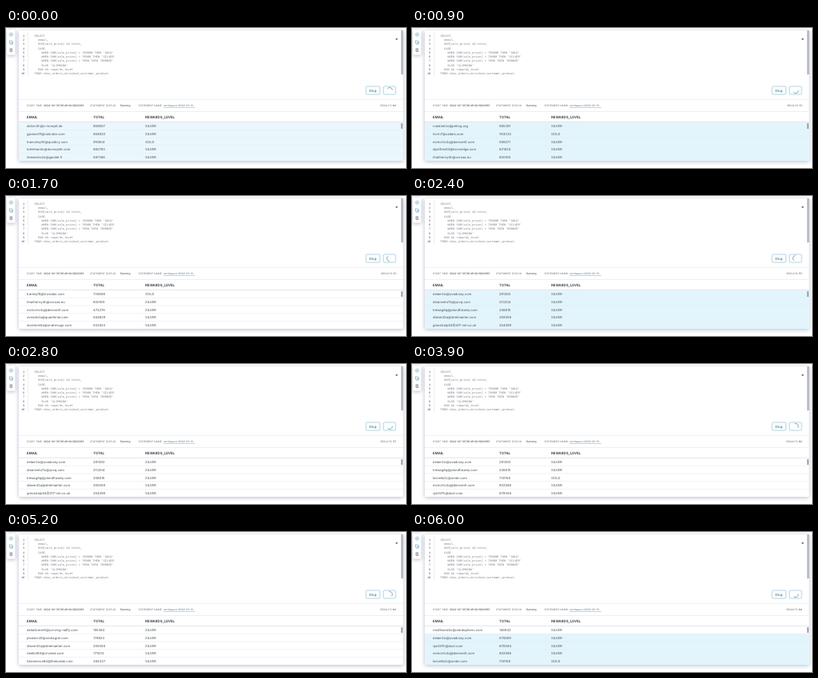
An HTML page that plays this animation: 500 px wide and 175 px high, repeating every 6.1 s.

```html
<!DOCTYPE html>
<html lang="en">
<head>
<meta charset="utf-8">
<title>Streaming query results</title>
<style>
  html, body { margin: 0; width: 100%; height: 100%; overflow: hidden; background: #fff; }
  svg { display: block; width: 500px; height: 175px; text-rendering: geometricPrecision; }
  text { font-family: Inter, sans-serif; font-size: 4.1px; fill: #4b4f56; white-space: pre; }
  .code text { font-family: "Liberation Mono", monospace; font-size: 3.68px; fill: #777b82; }
  .code .num { text-anchor: end; fill: #555; }
  .info text { font-size: 3.25px; font-weight: 500; fill: #4c5158; }
  .info .label { font-size: 3.15px; fill: #7d828b; }
  .info .link { font-weight: 400; fill: #4d7890; text-decoration: underline; }
  .head text { font-size: 4.35px; font-weight: 600; fill: #33373d; }
  .panel { fill: #fff; filter: drop-shadow(0 1px 2.5px rgba(65, 70, 115, .38)); }
  .button { fill: #fff; stroke: #94c3d5; stroke-width: .7; }
  .icon { fill: none; stroke: #6aa9be; stroke-width: .6; }
</style>
</head>
<body>
<svg viewBox="0 0 500 175">
  <rect class="panel" x="1" y="2" width="10.5" height="31.5" rx="1"/>
  <g class="icon">
    <circle cx="6.4" cy="8.2" r="2.1"/>
    <path d="M5.4 8.2h2M6.4 7.2v2"/>
    <rect x="4.3" y="16" width="3" height="3"/>
    <path d="M5.7 19v1.2h2.8v-3h-1.2"/>
    <path stroke="#666b74" d="M4.5 26.2h3.6M5 26.4v3.2h2.6v-3.2M5.6 25.6h1.4M6.3 27v2"/>
  </g>

  <rect class="panel" x="16" y="3" width="480.5" height="163" rx="1"/>
  <path d="M27.5 5V60" stroke="#e1e3e7" stroke-width=".6"/>
  <g class="code" id="code"></g>
  <rect x="493.8" y="3" width="2.7" height="55" fill="#b4b7c2"/>
  <path d="M486.6 13.2h3.4l-1.7 2z" fill="#555"/>

  <rect class="button" x="450" y="73" width="17.3" height="10" rx="1"/>
  <text x="458.6" y="79.6" text-anchor="middle" style="fill:#357f9c;font-size:4.4px;font-weight:500">Stop</text>
  <rect class="button" x="471.8" y="73" width="15.2" height="10" rx="1"/>
  <path id="spinner" d="M-3.3 -1.2A3.5 3.5 0 0 1 3.3 -1.2" fill="none" stroke="#5f8fa4" stroke-width=".7"/>

  <path d="M16 89.3H496.5M16 104.5H496.5" stroke="#dfe2e6" stroke-width=".6"/>
  <g class="info">
    <text class="label" x="26" y="98.2">START TIME:</text>
    <text x="47" y="98.2">2024-02-13T09:49:06.580339Z</text>
    <text class="label" x="105" y="98.2">STATEMENT STATUS:</text>
    <text x="142.8" y="98.2">Running</text>
    <text class="label" x="165.5" y="98.2">STATEMENT NAME:</text>
    <text class="link" x="197" y="98.2">workspace-2024-02-13...</text>
    <text class="label" x="487.5" y="98.2" text-anchor="end">RESULTS: <tspan id="count" fill="#4c5158"></tspan></text>
  </g>
  <g class="head">
    <text x="26" y="112.6">EMAIL</text>
    <text x="109" y="112.6">TOTAL</text>
    <text x="174" y="112.6">REWARDS_LEVEL</text>
  </g>
  <g id="rows"></g>
  <path d="M16 117.3H496.5" stroke="#cfd3d8" stroke-width=".6"/>
  <rect x="493.8" y="119" width="2" height="7" rx=".6" fill="#9a9ea6"/>
</svg>
<script>
const LOOP = 6100, TICK = 100, FLASH = 350, FADE = 200;
const SPIN_START = 15, SPIN_RATE = .563; // degrees, degrees per ms
const ROW_TOP = 117.5, ROW_HEIGHT = 9.72;

const sql = `SELECT
  email,
  SUM(sale_price) AS total,
  CASE
    WHEN SUM(sale_price) > 700000 THEN 'GOLD'
    WHEN SUM(sale_price) > 70000 THEN 'SILVER'
    WHEN SUM(sale_price) > 7000 THEN 'BRONZE'
    ELSE 'CLIMBING'
  END AS rewards_level
FROM shoe_orders_enriched_customer_product`;

// Each update: start time, result count, first highlighted row, rows of "email total".
const updates = [
  [-200, 60, 0, `dolvin3h@v-morqet.de 659807
gpranel7t@oskrube.com 656920
tnavorley55@quolbry.com 916804
kdrelmanto@dunvoplet.com 682783
lmeestrex2s@gavdel.fr 587366`],
  [800, 51, 0, `rvastink3v@pelrog.org 685391
lvorn7@uzdalo.com 763032
mchorlic3q@denvarilt.com 599271
dpolfren63@brovnelga.com 621624
hhatherny4h@ovrusa.eu 600165`],
  [1250, 51, 0, `tranleyf9@linvodax.com 730866
hhatherny4h@ovrusa.eu 600165
mchorlic3q@denvarilt.com 472276
ovesdo3s@quambrist.com 648829
stombrel4a@ondrevogo.com 632923`],
  [2250, 57, 0, `eelanrtw@uvadoray.com 291393
dmanveto7b@yovq.com 213204
trelsag8q@plondfrasely.com 206815
dlavent3a@strelmanter.com 259358
gmostralp54@417-vel.co.uk 254299`],
  [3350, 60, 0, `eelanrtw@uvadoray.com 291393
trelsag8q@plondfrasely.com 206815
tarvells2z@umdv.com 730158
mchorlic3q@denvarilt.com 602588
vjarl97h@doxt.com 679364`],
  [4100, 60, 0, `dshallomer9@corvlog-natfy.com 155364
plodarvi2t@ondragrel.com 179623
dlavent3a@strelmanter.com 259358
nbellot60@orvewd.com 171033
tdramence64@fenbodak.com 294327`],
  [5850, 64, 1, `rmalthand4x@ostrakpheno.com 146943
eelanrtw@uvadoray.com 570859
vjarl97h@doxt.com 679364
mchorlic3q@denvarilt.com 602588
tarvells2z@umdv.com 730158`]
].map(([at, count, firstLit, list]) => ({
  at, count, firstLit, rows: list.split("\n").map(line => line.split(" "))
}));

const byId = id => document.getElementById(id);

function add(parent, tag, attrs, content = "") {
  const node = document.createElementNS("http://www.w3.org/2000/svg", tag);
  for (const [key, value] of Object.entries(attrs)) node.setAttribute(key, value);
  node.textContent = content;
  return parent.appendChild(node);
}

sql.split("\n").forEach((line, i) => {
  const y = 10.8 + i * 5.27;
  add(byId("code"), "text", { class: "num", x: 23.3, y }, i + 1);
  add(byId("code"), "text", { x: 35.6, y }, line);
});

const rows = Array.from({ length: 5 }, (_, i) => {
  const y = ROW_TOP + i * ROW_HEIGHT, group = byId("rows");
  const light = add(group, "rect", { x: 16, y, width: 480.5, height: ROW_HEIGHT, fill: "#e3f5fc" });
  if (i) add(group, "path", { d: `M16 ${y}H496.5`, stroke: "#e0e5e9", "stroke-width": .5 });
  const cells = [26, 109, 174].map(x => add(group, "text", { x, y: y + 6.7 }));
  return { light, cells };
});

let shown;
function draw(now) {
  const time = Math.floor(now % LOOP / TICK) * TICK;
  const update = updates.findLast(u => u.at <= time);
  if (update !== shown) {
    shown = update;
    byId("count").textContent = update.count;
    rows.forEach(({ cells }, i) => {
      const [email, total] = update.rows[i];
      [email, total, total > 700000 ? "GOLD" : "SILVER"].forEach((value, c) => cells[c].textContent = value);
    });
  }
  const glow = Math.max(0, Math.min(1, (FLASH - time + update.at) / FADE));
  rows.forEach(({ light }, i) => light.setAttribute("opacity", i < update.firstLit ? 0 : glow));
  byId("spinner").setAttribute("transform", `translate(479.5 78) rotate(${SPIN_START + time * SPIN_RATE})`);
}

const start = performance.now();
function frame() {
  draw(performance.now() - start);
  requestAnimationFrame(frame);
}
frame();
</script>
</body>
</html>
```
